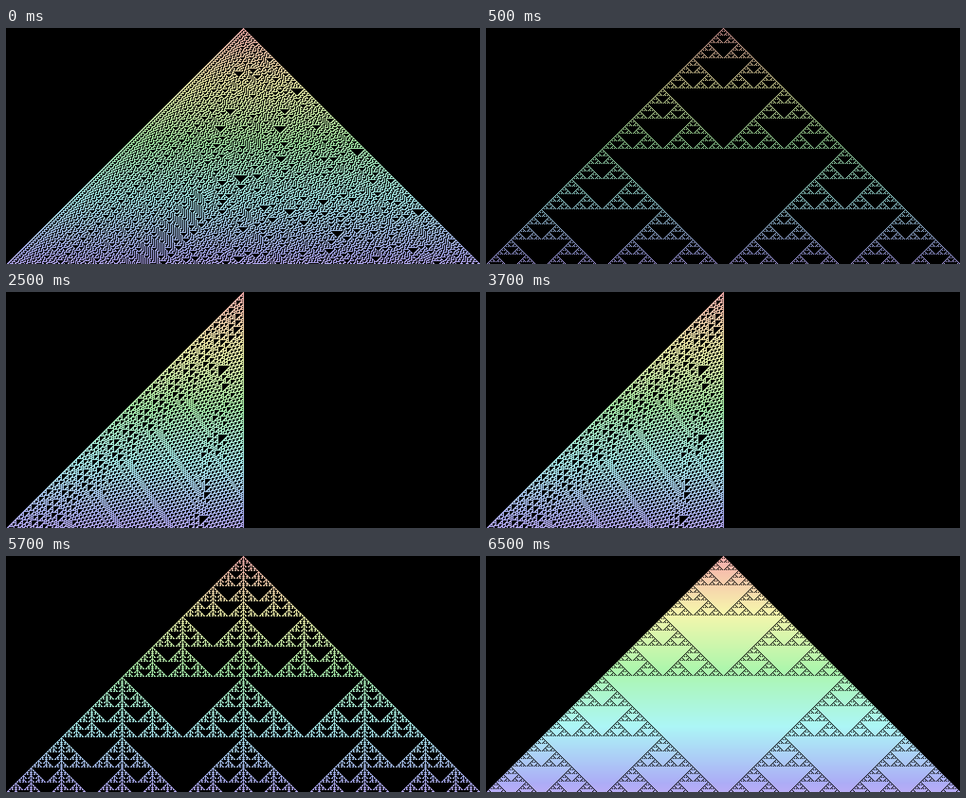
An HTML page with a canvas for the animation above (8000 ms loop, 1000x500 px).

```html
<!DOCTYPE html>
<html lang="en">
<head>
<meta charset="utf-8">
<title>Elementary cellular automata</title>
<style>
html, body { margin: 0; width: 100%; height: 100%; overflow: hidden; background: #000; }
canvas { display: block; }
</style>
</head>
<body>
<canvas id="stage" width="1000" height="500"></canvas>
<script>
const ctx = document.getElementById('stage').getContext('2d');
const CELL = 2, COLS = 500, ROWS = 250, LOOP = 8000;

// Wolfram rule number and the time at which it takes over
const scenes = [
  { rule: 30, start: 0 },
  { rule: 90, start: 500 },
  { rule: 110, start: 2500 },
  { rule: 150, start: 4500 },
  { rule: 182, start: 6500 }
];

function nextRow(cells, rule) {
  return cells.map((c, i) => {
    const left = cells[i - 1] || 0, right = cells[i + 1] || 0;
    return rule >> (left * 4 + c * 2 + right) & 1;
  });
}

function draw(rule) {
  ctx.fillStyle = '#000';
  ctx.fillRect(0, 0, COLS * CELL, ROWS * CELL);
  let cells = new Uint8Array(COLS);
  cells[COLS / 2] = 1;
  for (let row = 0; row < ROWS; row++) {
    ctx.fillStyle = `hsl(${row}, 80%, 82%)`; // one degree of hue per row
    cells.forEach((on, col) => {
      if (on) ctx.fillRect(col * CELL, row * CELL, CELL, CELL);
    });
    cells = nextRow(cells, rule);
  }
}

let shown;
const origin = performance.now();

function tick() {
  const time = (performance.now() - origin) % LOOP;
  const scene = scenes.findLast(s => s.start <= time);
  if (scene !== shown) draw((shown = scene).rule);
  requestAnimationFrame(tick);
}
tick();
</script>
</body>
</html>
```
